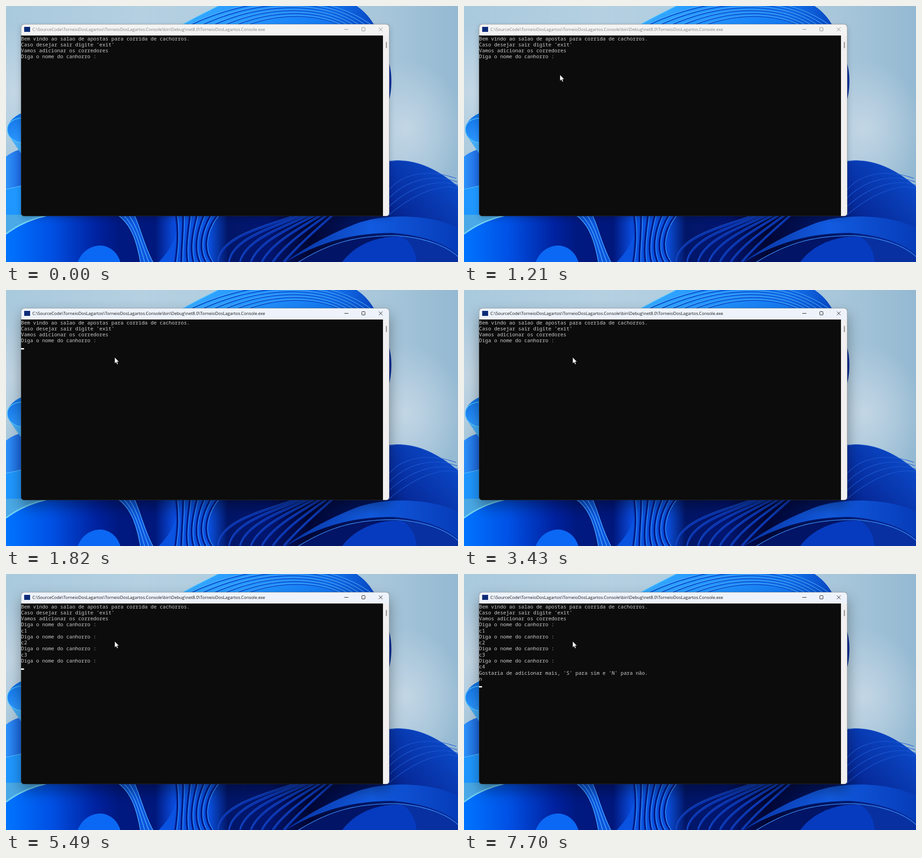
An HTML page that plays this animation: 994 by 564 pixels, repeating every 8000 ms.

```html
<!DOCTYPE html>
<html lang="pt">
<head>
<meta charset="utf-8">
<title>Console</title>
<style>
  html, body { margin: 0; width: 100%; height: 100%; overflow: hidden; background: #a9c8dc; }
  svg { position: absolute; left: 0; top: 0; display: block; }
  .shadow {
    position: absolute; left: 33px; top: 40px; width: 810px; height: 423px; border-radius: 7px;
    box-shadow: 0 5px 13px rgba(0, 0, 0, .2), 0 0 1px rgba(0, 0, 0, .5);
    animation: lift 8s step-end infinite;
  }
  .bar { fill: #f3f3f3; animation: bar 8s step-end infinite; }
  .path { font: 9.42px "Open Sans", "Noto Sans", sans-serif; fill: #808080; animation: ink 8s step-end infinite; }
  .buttons { fill: none; stroke: #8a8a8a; animation: edge 8s step-end infinite; }
  .console { font: 11.05px "Noto Sans Mono", "DejaVu Sans Mono", monospace; fill: #ccc; }
  .pointer { visibility: hidden; animation: point 8s step-end infinite; }

  @keyframes lift {
    16% { box-shadow: 0 9px 20px rgba(0, 0, 0, .28), 0 0 1px rgba(0, 0, 0, .6); }
    16.75%, 100% { box-shadow: 0 14px 30px rgba(0, 0, 0, .36), 0 0 1px rgba(0, 0, 0, .6); }
  }
  @keyframes bar { 16% { fill: #f0f3f8; } 16.75%, 100% { fill: #eef3fb; } }
  @keyframes ink { 16%, 100% { fill: #101010; } }
  @keyframes edge { 16%, 100% { stroke: #151515; } }
  @keyframes point {
    0% { visibility: hidden; transform: translate(737px, 449px); }
    5.75% { visibility: visible; transform: translate(737px, 449px); animation-timing-function: steps(5, end); }
    10.4375% { visibility: visible; transform: translate(380px, 246px); animation-timing-function: steps(5, end); }
    15.125% { visibility: visible; transform: translate(211px, 151.5px); }
    18.5% { visibility: visible; transform: translate(219px, 151px); }
    19.375% { visibility: visible; transform: translate(232px, 149px); }
    20.25%, 100% { visibility: visible; transform: translate(239px, 148.3px); }
  }
</style>
</head>
<body>
<svg width="994" height="564" viewBox="0 0 994 564">
  <defs>
    <linearGradient id="sky">
      <stop offset="0" stop-color="#a9c9dd"/><stop offset=".3" stop-color="#b4d0e1"/>
      <stop offset=".82" stop-color="#a9c7db"/><stop offset="1" stop-color="#94b9d2"/>
    </linearGradient>
    <radialGradient id="haze">
      <stop offset="0" stop-color="#c6d8e6" stop-opacity=".9"/><stop offset="1" stop-color="#c6d8e6" stop-opacity="0"/>
    </radialGradient>
    <linearGradient id="crest">
      <stop offset="0" stop-color="#38adff"/><stop offset=".35" stop-color="#2496ff"/>
      <stop offset=".75" stop-color="#1479f2"/><stop offset="1" stop-color="#0740bd"/>
    </linearGradient>
    <linearGradient id="floor">
      <stop offset="0" stop-color="#0074ff"/><stop offset=".1" stop-color="#0050e4"/>
      <stop offset=".2" stop-color="#0022a0"/><stop offset=".25" stop-color="#001980"/>
      <stop offset=".33" stop-color="#00177c"/><stop offset=".37" stop-color="#0a49d8"/>
      <stop offset=".45" stop-color="#0a4fdc"/><stop offset=".49" stop-color="#021668"/>
      <stop offset=".58" stop-color="#021570"/><stop offset=".67" stop-color="#010633"/>
      <stop offset=".76" stop-color="#021258"/><stop offset="1" stop-color="#032a9c"/>
    </linearGradient>
    <linearGradient id="petal" x1="0" y1="1" x2=".7" y2="0">
      <stop offset="0" stop-color="#020c4a"/><stop offset=".45" stop-color="#062a9a"/><stop offset="1" stop-color="#0b49c8"/>
    </linearGradient>
    <linearGradient id="band">
      <stop offset="0" stop-color="#07309c"/><stop offset=".5" stop-color="#125be0"/><stop offset="1" stop-color="#063cb8"/>
    </linearGradient>
    <linearGradient id="cup" x2="0" y2="1">
      <stop offset="0" stop-color="#1172e4"/><stop offset="1" stop-color="#2c97ff"/>
    </linearGradient>
    <linearGradient id="side">
      <stop offset="0" stop-color="#2f93fb"/><stop offset="1" stop-color="#1c66dc"/>
    </linearGradient>
    <clipPath id="top"><path d="M386 42C428 18 448 10 470-2H768C790 12 801 27 810 42Z"/></clipPath>
    <clipPath id="frame"><rect x="33" y="40" width="810" height="423" rx="7"/></clipPath>
  </defs>

  <rect width="994" height="564" fill="url(#sky)"/>
  <ellipse cx="20" cy="190" rx="160" ry="150" fill="url(#haze)"/>
  <ellipse cx="880" cy="270" rx="130" ry="150" fill="url(#haze)"/>

  <g clip-path="url(#top)">
    <rect x="380" y="-2" width="440" height="46" fill="url(#crest)"/>
    <g id="arcs"/>
  </g>
  <path d="M386 42C428 18 448 10 470-2" fill="none" stroke="#63c9ff" stroke-width="1.5"/>
  <path d="M840 118C850 145 850 185 840 216Z" fill="#0a2f9c"/>

  <path d="M0 332C10 323 24 318 34 315V510H0Z" fill="url(#side)"/>
  <path d="M0 404L34 396V510H0Z" fill="#1f97ff"/>
  <path d="M0 404L34 396" stroke="#6bc9ff"/>
  <path d="M5 284L34 326V296Z" fill="#46aef8"/>
  <path d="M34 236C17 244 3 256 3 272C3 290 20 300 34 301Z" fill="url(#cup)"/>
  <path d="M34 247C17 248 3 256 3 272C3 290 20 300 34 301" fill="none" stroke="#55c6ff" stroke-width="1.5"/>

  <rect y="460" width="994" height="104" fill="url(#floor)"/>
  <path d="M0 460H84C54 471 24 486 0 504Z" fill="#4aa9e6"/>
  <path d="M0 502C24 484 54 470 88 462" fill="none" stroke="#73d2f4" stroke-width="3"/>
  <path d="M157 566C168 534 196 526 212 528C236 532 248 550 252 566Z" fill="#0b68f4"/>
  <path d="M245 460C276 480 288 520 296 566H324C304 530 296 490 282 460Z" fill="#0d55dc"/>
  <g id="stems"/>
  <path d="M374 460C380 505 364 536 334 566H454C430 536 440 492 466 460Z" fill="#0a52e0"/>
  <g id="flare"/>
  <g id="depth"/>

  <path d="M840 343C890 335 940 352 994 398V566H840Z" fill="url(#petal)"/>
  <path d="M840 342C890 335 940 352 994 398" fill="none" stroke="#1a55cc"/>
  <g id="sweep"/>
  <path d="M612 566C690 520 760 500 850 500C920 505 970 525 994 548V488C940 462 850 455 780 476C700 505 640 545 612 566Z" fill="url(#band)"/>
  <path d="M640 566C710 522 770 505 860 506C925 511 970 530 994 552V566Z" fill="#021466"/>
  <path d="M738 566C770 520 830 505 870 508C900 520 900 550 905 566Z" fill="#063bc0"/>
  <path d="M870 508C925 511 970 530 994 552V566H905C900 540 890 518 870 508Z" fill="#0830a0"/>
  <path d="M640 566C710 522 770 505 860 506C925 511 970 530 994 552" fill="none" stroke="#3b8cf2" stroke-width="1.5"/>
</svg>

<div class="shadow"></div>

<svg width="994" height="564" viewBox="0 0 994 564">
  <g clip-path="url(#frame)">
    <rect x="33" y="40" width="810" height="423" fill="#0c0c0c"/>
    <rect class="bar" x="33" y="40" width="810" height="25"/>
    <rect x="829" y="65" width="14" height="398" fill="#f1efef"/>
  </g>
  <rect x="33.5" y="40.5" width="809" height="422" rx="6.5" fill="none" stroke="#555" stroke-opacity=".35"/>
  <rect x="835.5" y="79" width="2" height="14" rx="1" fill="#858585"/>
  <rect x="40" y="46" width="13" height="11" fill="#0d2b78"/>
  <text class="path" x="58" y="55.3">C:\SourceCode\TorneioDosLagartos\TorneioDosLagartos.Console\bin\Debug\net8.0\TorneioDosLagartos.Console.exe</text>
  <g class="buttons">
    <path d="M744 51.5H753"/>
    <rect x="782.5" y="47.5" width="7" height="7.5" rx="1"/>
    <path d="M820 47.5L828 55.5M828 47.5L820 55.5"/>
  </g>
  <g class="console" id="console"></g>
  <rect id="caret" width="6.63" height="3" fill="#fff" visibility="hidden"/>
  <path class="pointer" d="M0 0V13.6L3.1 10.8L5.3 15.6L7.5 14.6L5.3 9.9H9.6Z" fill="#fff" stroke="#000" stroke-width=".6"/>
</svg>

<script>
const NS = 'http://www.w3.org/2000/svg';
const byId = id => document.getElementById(id);

function add(parent, tag, attrs) {
  const el = document.createElementNS(NS, tag);
  for (const key in attrs) el.setAttribute(key, attrs[key]);
  return parent.appendChild(el);
}

// Blends one cubic curve into another to draw a family of folds.
function folds(id, a, b, count, stroke, width) {
  for (let i = 0; i < count; i++) {
    const k = i / (count - 1);
    const p = a.map((v, j) => v + (b[j] - v) * k);
    add(byId(id), 'path', {
      d: `M${p[0]} ${p[1]}C${p.slice(2).join(' ')}`,
      fill: 'none', stroke, 'stroke-width': width
    });
  }
}

folds('arcs', [405, 42, 540, -22, 700, -32, 802, 42], [530, 42, 600, 16, 680, 16, 735, 42], 6, '#0b55d4', 3);
folds('arcs', [402, 42, 537, -24, 700, -34, 804, 42], [527, 42, 598, 14, 682, 14, 738, 42], 6, '#62c6ff', 1);
folds('stems', [245, 460, 276, 480, 288, 520, 296, 566], [282, 460, 296, 490, 304, 530, 324, 566], 4, '#48a8ff', 1.6);
folds('flare', [374, 460, 380, 505, 376, 536, 372, 566], [466, 460, 440, 492, 430, 536, 454, 566], 7, '#021c88', 4);
folds('flare', [377, 460, 383, 505, 379, 536, 375, 566], [469, 460, 443, 492, 433, 536, 457, 566], 7, '#3a96fa', 1.4);
folds('depth', [466, 566, 470, 510, 560, 490, 645, 460], [610, 566, 640, 530, 680, 495, 720, 460], 7, '#0a36b4', 4);
folds('depth', [466, 562, 470, 507, 560, 487, 645, 457], [610, 562, 640, 527, 680, 492, 720, 457], 7, '#2464dc', 1);
folds('sweep', [840, 408, 870, 368, 930, 358, 990, 380], [840, 462, 900, 410, 960, 390, 996, 402], 4, '#1f5ad6', 1.2);

const LOOP = 8000, LEFT = 33, TOP = 65, ROW = 13.27, COL = 6.63;
const ask = 'Diga o nome do canhorro :';
const intro = [
  'Bem vindo ao salao de apostas para corrida de cachorros.',
  "Caso desejar sair digite 'exit'",
  'Vamos adicionar os corredores',
  ask
];

// [time, row, text]
const output = [
  ...intro.map((text, row) => [0, row, text]),
  [3760, 4, 'c'], [3830, 4, 'c1'], [3960, 5, ask],
  [4490, 6, 'c'], [4690, 6, 'c2'], [4760, 7, ask],
  [5230, 8, 'c'], [5360, 8, 'c3'], [5490, 9, ask],
  [5970, 10, 'c'], [6040, 10, 'c4'],
  [6170, 11, "Gostaria de adicionar mais, 'S' para sim e 'N' para não."],
  [7560, 12, 'n']
];

// [time, row, column]; no row means the caret is off
const blinks = [
  [0], [1820, 4, 0], [2350], [2880, 4, 0], [3430],
  [3760, 4, 1], [3830, 4, 2], [3960, 6, 0],
  [4490, 6, 1], [4690, 6, 2], [4760, 8, 0],
  [5230, 8, 1], [5360, 8, 2], [5490, 10, 0],
  [5970, 10, 1], [6040, 10, 2], [6170, 12, 0], [7100],
  [7560, 12, 1], [7700, 13, 0]
];

const rows = Array.from({ length: 13 }, (_, i) =>
  add(byId('console'), 'text', { x: LEFT, y: TOP + 10.6 + i * ROW }));
const caret = byId('caret');

function draw(t) {
  const shown = rows.map(() => '');
  for (const [time, row, text] of output) if (t >= time) shown[row] = text;
  shown.forEach((text, i) => { if (rows[i].textContent !== text) rows[i].textContent = text; });

  const [, row, col] = blinks.filter(b => t >= b[0]).pop();
  caret.setAttribute('visibility', row === undefined ? 'hidden' : 'visible');
  if (row !== undefined) {
    caret.setAttribute('x', LEFT + col * COL);
    caret.setAttribute('y', Math.round(TOP + (row + 1) * ROW - 3.3));
  }
}

let start;
function tick(now) {
  start ??= now;
  draw((now - start) % LOOP);
  requestAnimationFrame(tick);
}
draw(0);
requestAnimationFrame(tick);
</script>
</body>
</html>
```
